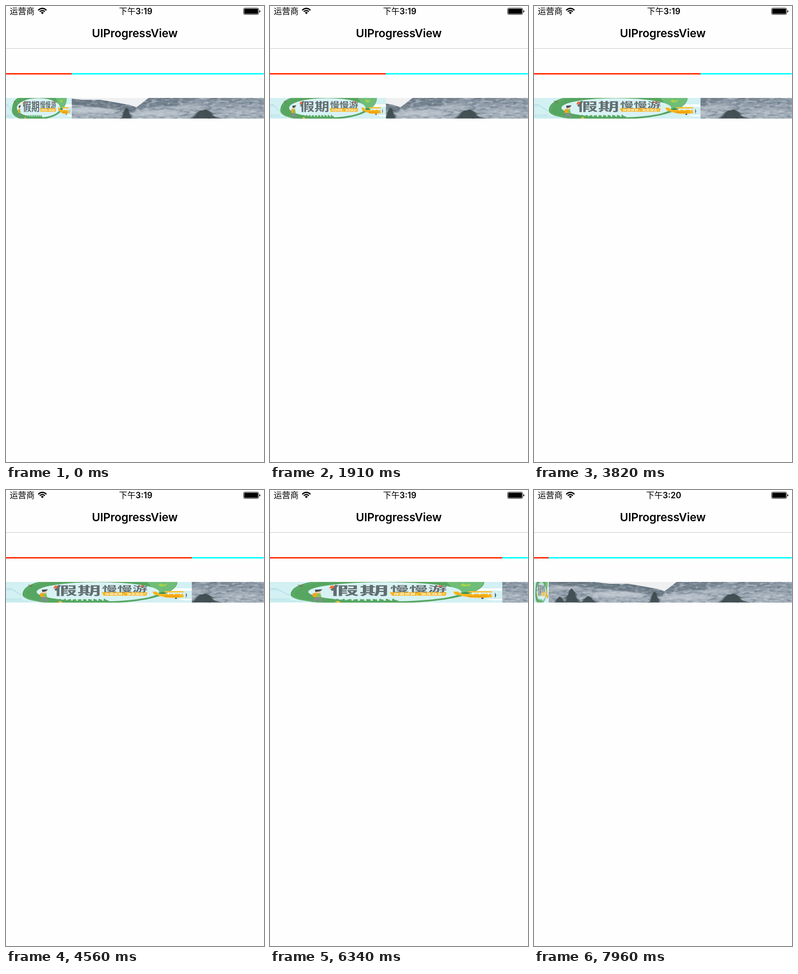
An HTML page that plays this animation: 561 px wide and 992 px high, repeating every 8000 ms.

```html
<!DOCTYPE html>
<html>
<head>
<meta charset="utf-8">
<title>UIProgressView</title>
<style>
  html, body { margin: 0; width: 100%; height: 100%; overflow: hidden; background: #fefefe; }
  body > svg { display: block; width: 561px; height: 992px; }
  text { font-family: Inter, "Noto Sans CJK SC", "Noto Sans CJK", sans-serif; }
  .clock { font-size: 18px; font-weight: 600; text-anchor: middle; }
  .clock tspan { font-weight: 500; }
  .headline { font-weight: 900; fill: #626d70; }
</style>
</head>
<body>
<svg viewBox="0 0 561 992">
  <defs>
    <filter id="soft" x="-20%" y="-60%" width="140%" height="220%"><feGaussianBlur stdDeviation="6 2.2"/></filter>
    <filter id="hazy"><feGaussianBlur stdDeviation="1.2 .7"/></filter>
    <filter id="snow" x="0" y="0" width="100%" height="100%" color-interpolation-filters="sRGB">
      <feTurbulence type="fractalNoise" baseFrequency=".07 .2" numOctaves="4" seed="8"/>
      <feColorMatrix values="0 0 0 0 .86  0 0 0 0 .89  0 0 0 0 .92  3.6 0 0 0 -1.75"/>
    </filter>
    <filter id="crag" x="0" y="0" width="100%" height="100%" color-interpolation-filters="sRGB">
      <feTurbulence type="fractalNoise" baseFrequency=".08 .22" numOctaves="4" seed="23"/>
      <feColorMatrix values="0 0 0 0 .3  0 0 0 0 .36  0 0 0 0 .42  3.6 0 0 0 -1.75"/>
    </filter>
    <linearGradient id="rock" x2="0" y2="1">
      <stop offset="0" stop-color="#8794a1"/><stop offset="1" stop-color="#a6b1bc"/>
    </linearGradient>
    <clipPath id="ridges">
      <path d="M0 0H130L165 4 205 4 240 10 268 15 284 20 296 11 310 0H561V45H0Z"/>
    </clipPath>
  </defs>

  <!-- status bar and title -->
  <text x="8" y="18" font-size="18">运营商</text>
  <path d="M70 9.200Q79 1.200 88 9.200M73.400 12.400Q79 7.400 84.600 12.400" fill="none" stroke="#000" stroke-width="2.600"/>
  <path d="M75.800 14.400Q79 11.600 82.200 14.400L79 17.800Z"/>
  <text id="before" class="clock" x="282" y="18"><tspan>下午</tspan>3:19</text>
  <text id="after" class="clock" x="282" y="18" opacity="0"><tspan>下午</tspan>3:20</text>
  <rect x="516.500" y="4.500" width="33" height="14" rx="3" fill="none" stroke="#000"/>
  <rect x="518" y="6" width="30" height="11" rx="1.200"/>
  <path d="M551 9Q553 9.500 553 11.500T551 14Z"/>
  <text x="280" y="68" font-size="24.600" font-weight="600" letter-spacing="-.2" text-anchor="middle">UIProgressView</text>
  <rect y="92" width="561" height="1" fill="#c6c6c8"/>

  <!-- plain bar -->
  <rect y="146" width="560.500" height="3" fill="#0ff"/>
  <rect id="fill" y="146" width="561" height="3" fill="#ff2a00"/>

  <!-- picture bar -->
  <svg y="200" width="561" height="45">
    <rect width="561" height="45" fill="#eff0f2"/>
    <g clip-path="url(#ridges)">
      <rect width="561" height="45" fill="url(#rock)"/>
      <g filter="url(#hazy)">
        <path d="M20 0H125L165 4 205 4 240 10 268 15 284 22 278 34 245 26 205 22 160 16 120 12 70 10Z" fill="#6d7b87"/>
        <path d="M310 0H425L395 8 372 17 330 17 290 26 284 20Z" fill="#75838f"/>
        <path d="M440 0H520L500 10 470 12Z" fill="#7d8a96"/>
      </g>
      <rect width="561" height="45" filter="url(#crag)" opacity=".4"/>
      <rect width="561" height="45" filter="url(#snow)" opacity=".45"/>
    </g>
    <g fill="#cbd2d9" filter="url(#soft)">
      <ellipse cx="60" cy="13" rx="42" ry="4" opacity=".6"/>
      <ellipse cx="180" cy="27" rx="60" ry="6" opacity=".75"/>
      <ellipse cx="330" cy="33" rx="55" ry="6" opacity=".65"/>
      <ellipse cx="395" cy="20" rx="35" ry="4" opacity=".5"/>
      <ellipse cx="510" cy="30" rx="45" ry="4" opacity=".4"/>
    </g>
    <path id="trees" fill="#39464a" opacity=".9"/>
  </svg>

  <g transform="translate(0 200)">
    <g id="banner">
      <svg width="540" height="45">
        <rect width="540" height="45" fill="#d3f0f2"/>
        <path d="M0 36H46V40H0ZM0 41H75V43H0Z" fill="#c2e8ed"/>
        <path d="M0 17Q10 11 20 17M5 18Q10 15 15 18M20 17 45 29" fill="none" stroke="#9dd6e2" stroke-width="1.200"/>
        <path d="M490 14H540V19H475ZM500 37H540V40H515Z" fill="#fff"/>
        <path d="M48 27C49 13 70 4 96 0H498Q499 9 482 18C458 31 410 41 330 45H112C72 41 48 36 48 27Z" fill="#56a661"/>
        <path d="M410 0H497Q497 9 478 19 462 26 444 30Z" fill="#6fbd78"/>
        <path d="M54 27C56 14 82 4 112 0M54 28C57 36 82 42 125 45" fill="none" stroke="#79c182" stroke-width=".8"/>
        <ellipse cx="267" cy="21.500" rx="178" ry="21" fill="#d8f2f4"/>
        <path id="skyline" fill="#56a661"/>
        <path d="M64 5 72 8 78 5 75 11 70 11Z" fill="#7a7d52"/>
        <path d="M442 7 450 3 456 6 468 4 463 9 450 10Z" fill="#a4d34b"/>
        <path d="M443 24 456 22 466 24 454 27Z" fill="#3f8c50"/>
        <path d="M150 43 158 41 165 44 158 45Z" fill="#e8c341"/>

        <!-- walker -->
        <path d="M105 20H118V25H106Z" fill="#f6c8a4"/>
        <path d="M104 17 122 16 117 20 106 22Z" fill="#454c4e"/>
        <path d="M105 25H117L120 33H106Z" fill="#86c452"/>
        <rect x="99" y="24" width="10" height="9" rx="3" fill="#f6a31f"/>
        <path d="M106 33H117L122 43H115L111 37 104 43H98Z" fill="#858e8f"/>

        <g transform="scale(2.75 1)">
          <text class="headline" x="50.500" y="28.500" font-size="25">假期</text>
          <text class="headline" x="101.600" y="21.500" font-size="16">慢慢游</text>
        </g>
        <path d="M142 8H151L146 14H137ZM393 7H400L397 11H390Z" fill="#f0703a"/>
        <path d="M278 22.500H411L408 30H284Z" fill="#f9b41c"/>
        <g transform="scale(2.75 1)">
          <text x="104.700" y="28.200" font-size="4.600" font-weight="700" fill="#fff">环游世界，说走就走!</text>
        </g>

        <!-- biplane -->
        <path d="M426 21H437L446 26H514L517 33Q495 36 465 34L430 27Z" fill="#f9b41c"/>
        <path d="M462 20H516V23H462Z" fill="#fbc230"/>
        <path d="M472 23V28M488 23V28M508 23V28" stroke="#fff" stroke-width="2"/>
        <path d="M458 30H506L500 32H462Z" fill="#e7960e"/>
        <path d="M523 23 526 29 523 35Z" fill="#444b4d"/>
        <ellipse cx="494" cy="35.500" rx="3" ry="1.500" fill="#444b4d"/>
      </svg>
    </g>
  </g>
</svg>

<script>
  const LOOP = 8000, STAGE = 561, BANNER = 540;
  const STEP = STAGE * 0.015, FIRST = STAGE * 0.255;
  const LAST_STEP = 54, RESET_STEP = 50, LAST_WIDTH = 32, CLOCK_STEP = 44;
  const byId = id => document.getElementById(id);

  // Each run of steps: start, end, count
  const runs = [
    [150, 1180, 8], [1320, 2350, 8], [2490, 3520, 8], [3670, 4710, 8],
    [4860, 5890, 8], [6040, 7080, 8], [7220, 7960, 6]
  ];
  const times = [0];
  for (const [start, end, count] of runs) {
    for (let i = 0; i < count; i++) {
      times.push(Math.round((start + (end - start) * i / (count - 1)) / 10) * 10);
    }
  }

  const widthAt = step => Math.round(step < RESET_STEP
    ? FIRST + step * STEP
    : Math.max(0, LAST_WIDTH - (LAST_STEP - step) * STEP));

  function playSteps(id, styleAt) {
    const frames = times.map((time, step) => (
      { offset: time / LOOP, easing: 'steps(1, end)', ...styleAt(step) }));
    frames.push({ offset: 1, ...styleAt(LAST_STEP) });
    byId(id).animate(frames, { duration: LOOP, iterations: Infinity });
  }

  // A conifer standing on the lower edge, with ragged tiers
  function tree(x, top, spread) {
    const tiers = 9, left = [], right = [];
    for (let i = 1; i <= tiers; i++) {
      const y = top + (45 - top) * i / tiers;
      const reach = spread * (i / tiers) ** 0.7;
      const sway = 0.2 * Math.sin(i * 5 + x);
      right.push(`${x + reach * (0.85 + sway)} ${y}`, `${x + reach * 0.5} ${y - 0.4}`);
      left.unshift(`${x - reach * 0.5} ${y - 0.4}`, `${x - reach * (0.85 - sway)} ${y}`);
    }
    return `M${x} ${top}L${right.join(' ')} ${left.join(' ')}Z`;
  }

  byId('trees').setAttribute('d', [
    [82, 14, 24], [56, 32, 18], [118, 31, 25], [262, 21, 17], [424, 27, 28], [434, 25, 38]
  ].map(args => tree(...args)).join(''));

  let skyline = 'M122 45';
  for (let x = 124; x < 304; x += 5) {
    const height = 4 + 4.5 * Math.sin(x * 2.3) ** 2;
    skyline += `V${45 - height}H${x}`;
  }
  byId('skyline').setAttribute('d', skyline + 'V45Z');

  playSteps('fill', step => ({ transform: `scaleX(${widthAt(step) / STAGE})` }));
  playSteps('banner', step => ({ transform: `scaleX(${widthAt(step) / BANNER})` }));
  playSteps('before', step => ({ opacity: step < CLOCK_STEP ? 1 : 0 }));
  playSteps('after', step => ({ opacity: step < CLOCK_STEP ? 0 : 1 }));
</script>
</body>
</html>
```
